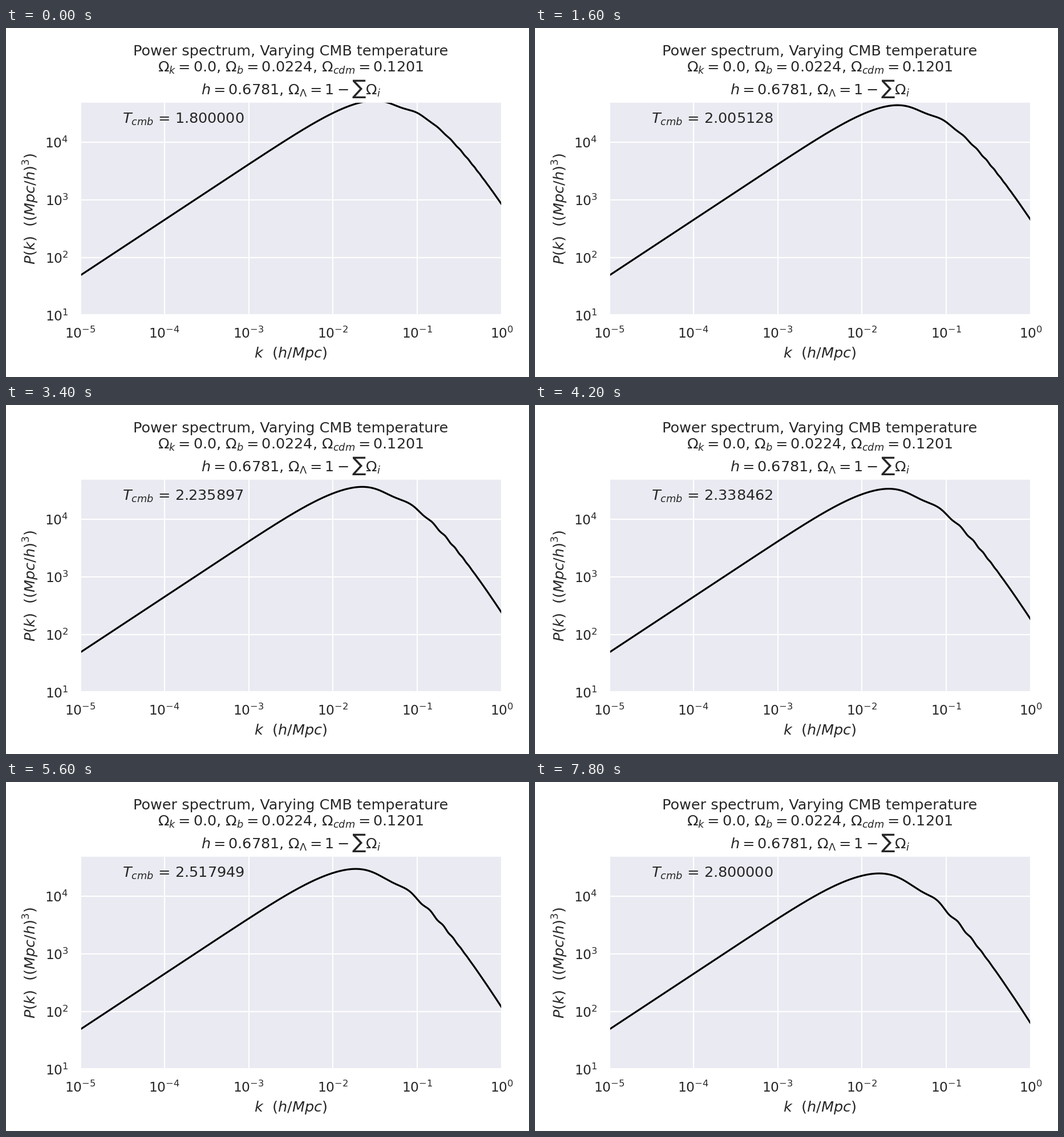
Animation of 917x611 px, one loop 8 s. Source, as a matplotlib script:

```python
import numpy as np
import matplotlib.pyplot as plt
from matplotlib.animation import FuncAnimation

W, H, DPI = 917, 611, 152.8
COUNT, STEP_MS = 40, 200
T_MIN, T_MAX, T_STD = 1.8, 2.8, 2.7255
OMEGA_B, OMEGA_CDM, LITTLE_H = 0.0224, 0.1201, 0.6781
N_S, LOG_AMP = 0.966, 1.684  # tilt, and log10 P at k = 1e-5

INK = "0.15"
plt.rcParams.update({
    "font.family": "DejaVu Sans",
    "mathtext.fontset": "dejavusans",
    "axes.facecolor": "#EAEAF2",
    "axes.edgecolor": "white",
    "axes.linewidth": 1.25,
    "axes.axisbelow": True,
    "axes.grid": True,
    "grid.color": "white",
    "grid.linewidth": 1,
    "text.color": INK,
    "axes.labelcolor": INK,
    "xtick.color": INK,
    "ytick.color": INK,
    "axes.labelsize": 12,
    "axes.titlesize": 12,
    "font.size": 12,
    "xtick.labelsize": 11,
    "ytick.labelsize": 11,
    "xtick.major.size": 6,
    "ytick.major.size": 6,
    "xtick.bottom": False,
    "ytick.left": False,
    "lines.solid_capstyle": "round",
})


def transfer(k, om, ob, stretch):
    """Eisenstein & Hu (1998) matter transfer function, k in 1/Mpc."""
    theta2 = (T_STD / 2.7) ** 2
    fb = ob / om
    fc = 1 - fb

    # Equality, drag epoch and sound horizon
    z_eq = 2.5e4 * om / theta2 ** 2
    k_eq = 0.0746 * om / theta2
    b1 = 0.313 * om ** -0.419 * (1 + 0.607 * om ** 0.674)
    b2 = 0.238 * om ** 0.223
    z_d = 1291 * om ** 0.251 / (1 + 0.659 * om ** 0.828) * (1 + b1 * ob ** b2)
    ratio = 31.5e3 * ob / theta2 ** 2
    r_d, r_eq = ratio / z_d, ratio / z_eq
    s = 2 / (3 * k_eq) * np.sqrt(6 / r_eq) * np.log(
        (np.sqrt(1 + r_d) + np.sqrt(r_d + r_eq)) / (1 + np.sqrt(r_eq)))
    ks = k * s * stretch
    k_silk = 1.6 * ob ** 0.52 * om ** 0.73 * (1 + (10.4 * om) ** -0.95)

    # Cold dark matter
    a1 = (46.9 * om) ** 0.670 * (1 + (32.1 * om) ** -0.532)
    a2 = (12 * om) ** 0.424 * (1 + (45 * om) ** -0.582)
    alpha_c = a1 ** -fb * a2 ** -(fb ** 3)
    c1 = 0.944 / (1 + (458 * om) ** -0.708)
    c2 = (0.395 * om) ** -0.0266
    beta_c = 1 / (1 + c1 * (fc ** c2 - 1))
    q = k / (13.41 * k_eq)

    def smooth(alpha, beta):
        log = np.log(np.e + 1.8 * beta * q)
        c = 14.2 / alpha + 386 / (1 + 69.9 * q ** 1.08)
        return log / (log + c * q * q)

    mix = 1 / (1 + (ks / 5.4) ** 4)
    t_c = mix * smooth(1, beta_c) + (1 - mix) * smooth(alpha_c, beta_c)

    # Baryons
    y = (1 + z_eq) / (1 + z_d)
    root = np.sqrt(1 + y)
    g = y * (-6 * root + (2 + 3 * y) * np.log((root + 1) / (root - 1)))
    alpha_b = 2.07 * k_eq * s * (1 + r_d) ** -0.75 * g
    beta_b = 0.5 + fb + (3 - 2 * fb) * np.sqrt((17.2 * om) ** 2 + 1)
    beta_node = 8.41 * om ** 0.435
    phase = ks / (1 + (beta_node / ks) ** 3) ** (1 / 3)
    damped = alpha_b / (1 + (beta_b / ks) ** 3) * np.exp(-(k / k_silk) ** 1.4)
    t_b = (smooth(1, 1) / (1 + (ks / 5.2) ** 2) + damped) * np.sinc(phase / np.pi)

    return fb * t_b + fc * t_c


def power(log_k, t_cmb):
    # Changing the CMB temperature rescales lengths and densities
    tau = t_cmb / T_STD
    k = 10 ** log_k * LITTLE_H / tau
    om = (OMEGA_B + OMEGA_CDM) / tau ** 3
    stretch = 1 - 0.08 * max(0, 2.45 - t_cmb)
    t = transfer(k, om, OMEGA_B / tau ** 3, stretch)
    return 10 ** (LOG_AMP + N_S * (log_k + 5)) * t ** 2


fig = plt.figure(figsize=((W + 1e-6) / DPI, (H + 1e-6) / DPI), dpi=DPI,
                 facecolor="white")
left, right, top, bottom = 129.8, 869.2, 129.2, 502.5
ax = fig.add_axes([left / W, 1 - bottom / H, (right - left) / W, (bottom - top) / H])
ax.set(xscale="log", yscale="log", xlim=(1e-5, 1), ylim=(10, 5e4))
ax.set_xlabel(r"$k\ \ (h/Mpc)$")
ax.set_ylabel(r"$P(k)\ \ ((Mpc/h)^3)$")
ax.set_title("\n".join([
    "Power spectrum, Varying CMB temperature",
    r"$\Omega_k = 0.0$, $\Omega_b = 0.0224$, $\Omega_{cdm} = 0.1201$",
    r"$h = 0.6781$, $\Omega_\Lambda = 1 - \sum\Omega_i$",
]))

log_k = np.linspace(-5, 0, 1000)
curve, = ax.plot(10 ** log_k, power(log_k, T_MIN), color="black", lw=1.5)
label = ax.text(0.1, 0.9, "", transform=ax.transAxes)


def update(i):
    t_cmb = T_MIN + (T_MAX - T_MIN) * i / (COUNT - 1)
    curve.set_ydata(power(log_k, t_cmb))
    label.set_text(r"$T_{cmb}$ = %f" % t_cmb)
    return curve, label


anim = FuncAnimation(fig, update, frames=COUNT, interval=STEP_MS,
                     repeat=True, repeat_delay=0)
plt.show()
```
